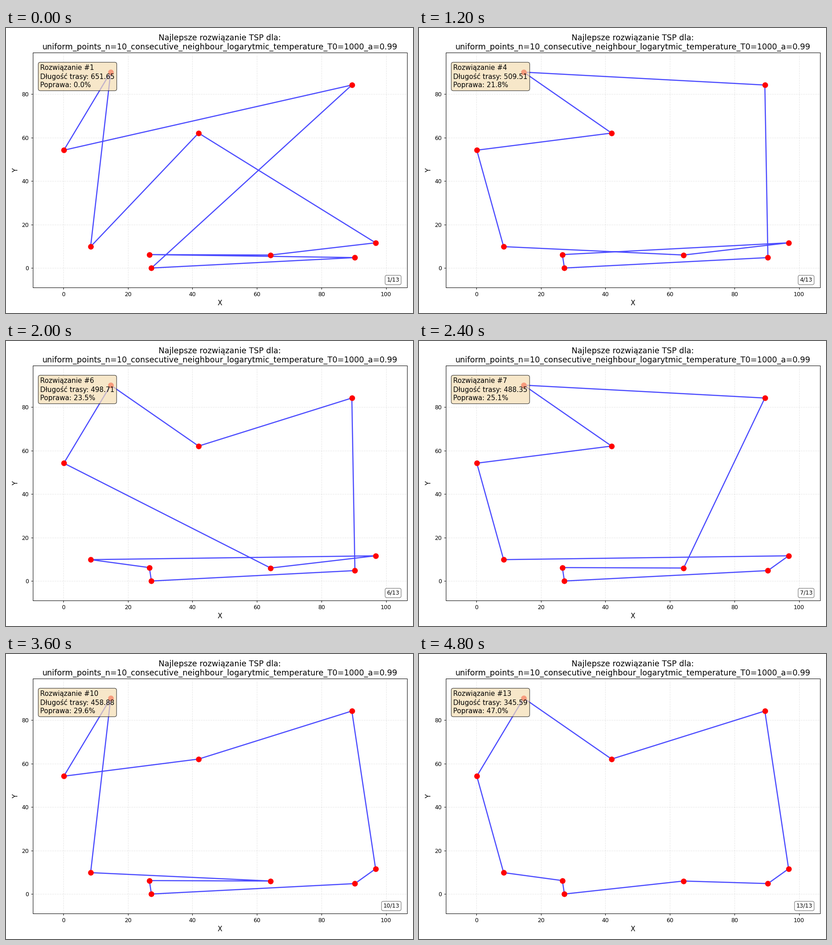
These frames come from a looping animation (894x626 px, 5.2 s). A matplotlib script:

```python
import matplotlib.pyplot as plt
from matplotlib.animation import FuncAnimation

WIDTH, HEIGHT, DPI = 894, 626, 89.4
LAYOUT_DPI = 100
STEP_MS = 400

CITIES = {
    "A": (14.68, 90.13), "B": (0.16, 54.23), "C": (89.42, 84.20),
    "D": (41.92, 62.10), "E": (8.46, 9.86), "F": (26.67, 6.20),
    "G": (27.30, 0.02), "H": (64.25, 6.00), "I": (90.37, 4.82),
    "J": (96.78, 11.62),
}

# Each improved tour with its length
SOLUTIONS = [
    ("ABCGIFHJDE", 651.65),
    ("ABCIGFHJDE", 568.97),
    ("ACIGFJHDEB", 533.17),
    ("ACIGFJHEBD", 509.51),
    ("ADCIFGEJHB", 501.92),
    ("ADCIGFEJHB", 498.71),
    ("ACHFGIJEBD", 488.35),
    ("ABDCIJGFHE", 472.80),
    ("ADCHFGIJEB", 461.83),
    ("ABDCJIGFHE", 458.88),
    ("ABDCJIGHFE", 452.77),
    ("ABDCJIHGFE", 384.52),
    ("ABEFGHIJCD", 345.59),
]
TOTAL = len(SOLUTIONS)

plt.rcParams["font.family"] = "DejaVu Sans"

# The tiny surplus keeps float rounding from losing a pixel
fig, ax = plt.subplots(
    figsize=((WIDTH + 1e-6) / DPI, (HEIGHT + 1e-6) / DPI), dpi=DPI)
ax.set_xlim(-9.45, 106.48)
ax.set_ylim(-9.01, 99.14)
title = ax.set_title(
    "Najlepsze rozwiązanie TSP dla:\n"
    "uniform_points_n=10_consecutive_neighbour_"
    "logarytmic_temperature_T0=1000_a=0.99",
    fontsize=14)
ax.set_xlabel("X", fontsize=12)
ax.set_ylabel("Y", fontsize=12)
ax.grid(True, linestyle="--", alpha=0.3)

# Margins follow the font metrics of the layout resolution
fig.set_dpi(LAYOUT_DPI)
fig.tight_layout()
fig.set_dpi(DPI)
title.set_linespacing(1.12)

route, = ax.plot([], [], "b-", lw=2, alpha=0.7)
ax.plot(*zip(*CITIES.values()), "ro", markersize=9, zorder=3)


def boxed_text(x, y, size, color, alpha, **style):
    box = dict(boxstyle="round", facecolor=color, alpha=alpha)
    return ax.text(x, y, "", transform=ax.transAxes, fontsize=size,
                   bbox=box, zorder=4, **style)


info = boxed_text(0.02, 0.95, 12, "wheat", 0.7, va="top", linespacing=1.3)
counter = boxed_text(0.98, 0.02, 10, "white", 0.5, ha="right", va="bottom")


def draw(i):
    tour, length = SOLUTIONS[i]
    route.set_data(*zip(*(CITIES[c] for c in tour + tour[0])))
    gain = 100 * (1 - length / SOLUTIONS[0][1])
    info.set_text(f"Rozwiązanie #{i + 1}\n"
                  f"Długość trasy: {length:.2f}\n"
                  f"Poprawa: {gain:.1f}%")
    counter.set_text(f"{i + 1}/{TOTAL}")
    return route, info, counter


anim = FuncAnimation(fig, draw, frames=TOTAL, interval=STEP_MS,
                     init_func=lambda: draw(0), repeat=True, repeat_delay=0)
plt.show()
```
